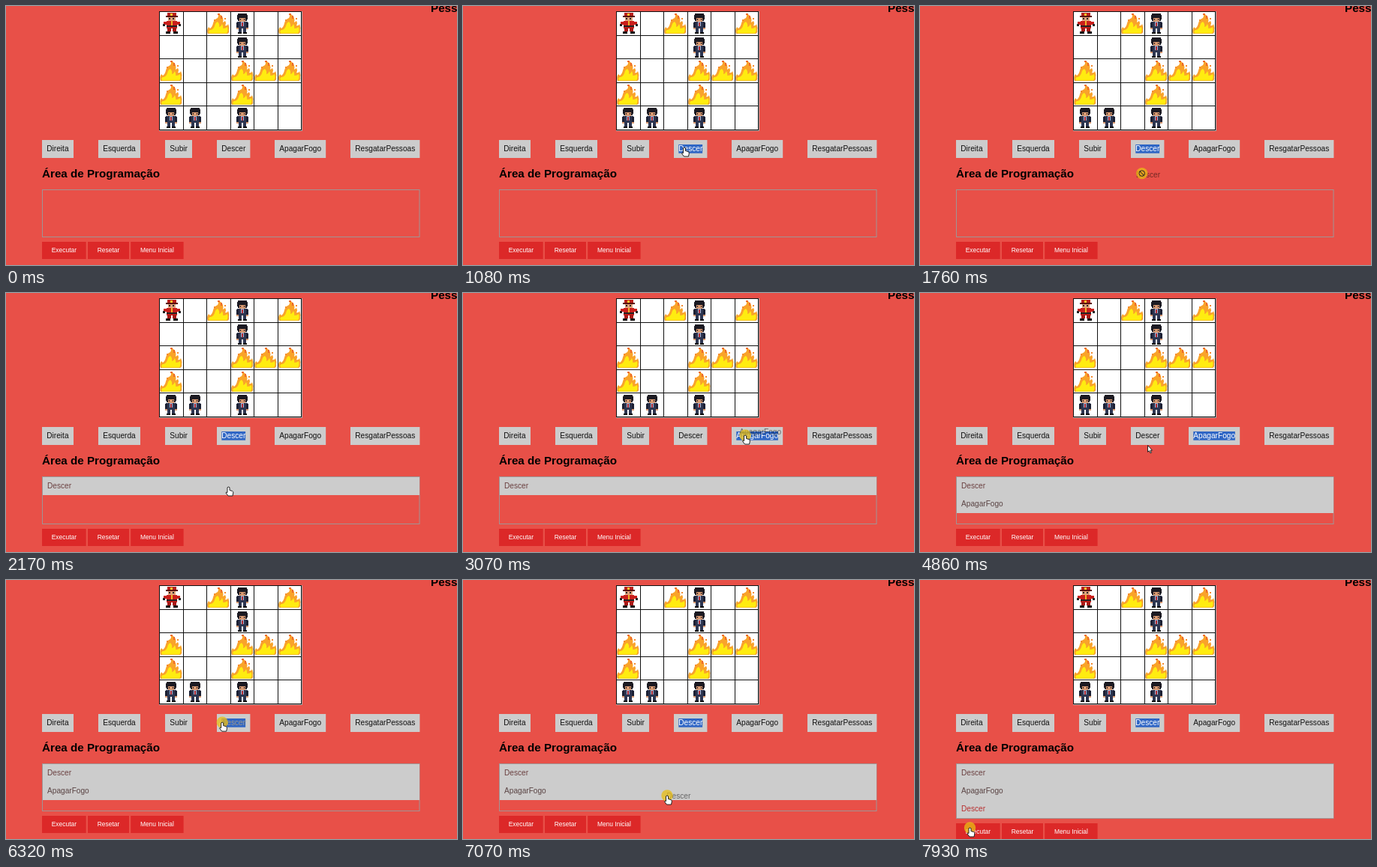
An HTML page with a canvas for the animation above (8 s loop, 601x346 px).

```html
<!DOCTYPE html>
<html lang="pt">
<head>
<meta charset="utf-8">
<title>Área de Programação</title>
<style>
  html, body { margin: 0; width: 100%; height: 100%; overflow: hidden; background: #e85048; }
  canvas { display: block; }
</style>
</head>
<body>
<canvas id="stage" width="601" height="346"></canvas>
<script>
const ctx = document.getElementById('stage').getContext('2d');
const LOOP = 8000;
const FAMILY = '"Liberation Sans", Arial, sans-serif';
const BODY = `10.14px ${FAMILY}`, SMALL = `8.45px ${FAMILY}`, TITLE = `bold 15.2px ${FAMILY}`;

// Cursor waypoints: time, x, y
const track = [
  [190, 526, 11], [480, 430, 322], [700, 338, 247], [950, 295, 189],
  [1430, 295, 189], [2100, 296.5, 259], [2240, 296.5, 259], [2900, 376, 190],
  [3070, 376, 190], [3830, 419, 193], [3960, 426, 213], [4350, 330, 262],
  [4650, 308, 236], [4860, 303.5, 203.5], [5420, 295, 192], [5640, 295, 192],
  [5920, 288, 190], [6320, 288, 190], [6600, 340, 222], [7070, 272, 288],
  [7130, 272, 288], [7730, 66.5, 331]
];
const presses = [[1010, 1075], [1430, 2100], [2800, 2870], [2940, 4350],
                 [5300, 5370], [6320, 7130], [7930, LOOP]];

const commands = [['Direita', 48, 42], ['Esquerda', 123, 56], ['Subir', 212, 36],
  ['Descer', 281, 44.4], ['ApagarFogo', 358, 68.2], ['ResgatarPessoas', 459, 92.4]]
  .map(([label, x, w]) => ({ label, x, w }));
const [, , , down, putOut] = commands;

const drags = [
  { command: down, start: 1430, drop: 2100, grab: [295, 189], ink: '#6b4040' },
  { command: putOut, start: 3070, drop: 4350, grab: [372, 195], ink: '#5a4444' },
  { command: down, start: 6320, drop: 7130, grab: [288, 190], ink: '#b83030' }
];

// Each part: colour x y w h
const person = `#1c1a22 10 3 12 10;#1c1a22 9 5 14 6;#d99a72 12 9 8 5;#1c1a22 13 10 1 2;
  #1c1a22 18 10 1 2;#2d3550 9 14 14 9;#1c2033 8 15 3 8;#1c2033 21 15 3 8;#d99a72 8 22 3 2;
  #d99a72 21 22 3 2;#9fb6d8 14 14 4 6;#b02a30 15 15 2 5;#2d3550 11 23 4 5;#2d3550 17 23 4 5;
  #111 10 28 5 2;#111 17 28 5 2`;
const firefighter = `#b81f1a 11 2 12 6;#5a1210 9 6 16 2;#f5c52c 15 3 3 3;#e2a37c 12 8 10 5;
  #222 13 9 2 2;#222 18 9 2 2;#c9201c 10 13 14 10;#c9201c 6 14 5 4;#c9201c 23 14 5 4;
  #222 5 17 3 3;#222 26 17 3 3;#222 10 19 14 2;#f0b42a 16 13 2 6;#a81a16 11 22 5 5;
  #a81a16 18 22 5 5;#111 9 27 6 3;#111 19 27 6 3`;
const flameOuter = new Path2D('M2 30Q0 25 3 21L5 23Q8 21 9 16Q10 11 15 9Q17 6 15 3Q21 5 22 9Q23 12 22 15L25 13Q27 16 25 19Q28 20 29 17Q31 22 30 25Q31 29 28 30Z');
const flameInner = new Path2D('M4 29.5Q2 26 5 25Q9 25 11 20Q12 15 15 14Q18 17 17 21Q20 20 21 17Q23 22 22 23Q26 23 28 21Q29.5 27 27 29.5Z');
const hand = new Path2D('M-1.5 .8Q0 -.8 1.5 .8V4.5L5 5.5Q6.5 6 6.3 8L5.5 12H-.5L-3.5 8Q-3.5 6.5 -1.5 7.5Z');
const arrow = new Path2D('M0 0V9L2 7.2 3.6 10.5 5 9.8 3.5 6.7H6Z');

// F = fire, P = person, B = firefighter
const board = ['B.FP.F', '...P..', 'F..FFF', 'F..F..', 'PP.P..'];
const colX = i => Math.floor(204.8 + 31.5 * i);
const rowY = i => Math.floor(7.6 + 31.5 * i);

function box(color, x, y, w, h) {
  ctx.fillStyle = color;
  ctx.fillRect(x, y, w, h);
}

function text(str, x, y, font = BODY, color = '#111') {
  ctx.font = font;
  ctx.fillStyle = color;
  ctx.fillText(str, x, y);
}

function at(x, y, paint) {
  ctx.save();
  ctx.translate(x, y);
  paint();
  ctx.restore();
}

function sprite(parts) {
  for (const part of parts.split(';')) {
    const [color, ...rect] = part.trim().split(' ');
    box(color, ...rect.map(Number));
  }
}

function fire() {
  ctx.fillStyle = '#f9a32a';
  ctx.fill(flameOuter);
  ctx.fillStyle = '#ffec10';
  ctx.fill(flameInner);
  box('#ee6a2c', 15, 3, 3, 2);
  box('#ee6a2c', 19, 6, 2, 4);
  box('#f58a2c', 24, 9, 2, 2);
  box('#f58a2c', 10, 11, 2, 2);
}

function drawBoard() {
  const right = colX(6), bottom = rowY(5);
  box('#fff', 205, 7, right - 204, bottom - 6);
  board.forEach((row, r) => [...row].forEach((kind, c) => at(colX(c), rowY(r), () => {
    if (kind === 'F') fire();
    if (kind === 'P') sprite(person);
    if (kind === 'B') sprite(firefighter);
  })));
  for (let i = 0; i <= 6; i++) box('#111', colX(i), 7, 1, bottom - 6);
  for (let i = 0; i <= 5; i++) box('#111', 204, rowY(i), right - 203, 1);
  box('#aaa', right + 1, 7, 1, bottom - 5);
  box('#aaa', 204, bottom + 1, right - 202, 1);
}

function drawCommands(selected) {
  for (const command of commands) {
    const { label, x, w } = command;
    box('#ccc', x, 179, w, 24);
    if (command === selected) box('#2f66c5', x + 6.3, 185, w - 12.6, 11.7);
    text(label, x + 6.3, 194.3, BODY, command === selected ? '#fff' : '#111');
  }
}

function drawProgram(rows) {
  const height = Math.max(64, rows.length * 24 + 2);
  ctx.strokeStyle = '#a09494';
  ctx.lineWidth = 1;
  ctx.strokeRect(48.5, 245.5, 502.5, height - 1);
  rows.forEach((row, i) => {
    box('#ccc', 49, 246 + 24 * i, 502, 24);
    text(row.command.label, 55, 261.3 + 24 * i, BODY, row.ink);
  });
  const y = 251 + height;
  for (const [label, x, w] of [['Executar', 48, 58.7], ['Resetar', 109, 55], ['Menu Inicial', 166.2, 70.4]]) {
    box('#dc2828', x, y, w, 23);
    text(label, x + 12.7, y + 14.2, SMALL, '#fff');
  }
}

function cursorAt(t) {
  const next = track.findIndex(point => point[0] > t);
  if (next < 0) return track[track.length - 1].slice(1);
  const [t0, x0, y0] = track[next - 1], [t1, x1, y1] = track[next];
  const k = (t - t0) / (t1 - t0);
  return [x0 + (x1 - x0) * k, y0 + (y1 - y0) * k];
}

function drawCursor(t, rows, drag) {
  const [x, y] = cursorAt(t);
  if (drag && t > drag.start) {
    const [gx, gy] = drag.grab;
    text(drag.command.label, drag.command.x + 6.3 + x - gx, 194.3 + y - gy, BODY, 'rgba(0,0,0,.5)');
  }
  if (presses.some(([from, to]) => t >= from && t < to)) {
    ctx.fillStyle = 'rgba(232,190,20,.75)';
    ctx.beginPath();
    ctx.arc(x, y, 7.7, 0, 7);
    ctx.fill();
  }
  const overCommand = y >= 179 && y < 203.3 && commands.some(c => x >= c.x && x <= c.x + c.w);
  const overRow = x >= 48 && x <= 551 && y >= 246 && y < 246 + rows.length * 24;
  const overAction = y > 320 && x >= 48 && x <= 237;
  at(x, y, () => {
    ctx.strokeStyle = '#222';
    ctx.lineWidth = 1;
    if (drag && !overCommand && y < 245) {
      ctx.beginPath();
      ctx.arc(0, 0, 3.8, 0, 7);
      ctx.moveTo(-2.6, -2.6);
      ctx.lineTo(2.6, 2.6);
      ctx.stroke();
      return;
    }
    const shape = drag || overCommand || overRow || overAction ? hand : arrow;
    ctx.fillStyle = '#fff';
    ctx.fill(shape);
    ctx.stroke(shape);
  });
}

function draw(t) {
  const rows = drags.filter(d => t >= d.drop);
  const drag = drags.find(d => t >= d.start && t < d.drop);
  const selected = t < 1010 ? null : t >= 2870 && t < 5300 ? putOut : down;
  box('#e85048', 0, 0, 601, 346);
  text('Pess', 566, 8, TITLE, '#000');
  drawBoard();
  drawCommands(selected);
  text('Área de Programação', 48, 229, TITLE, '#000');
  drawProgram(rows);
  if (t >= track[0][0]) drawCursor(t, rows, drag);
}

const start = performance.now();
function tick() {
  draw((performance.now() - start) % LOOP);
  requestAnimationFrame(tick);
}
tick();
</script>
</body>
</html>
```
